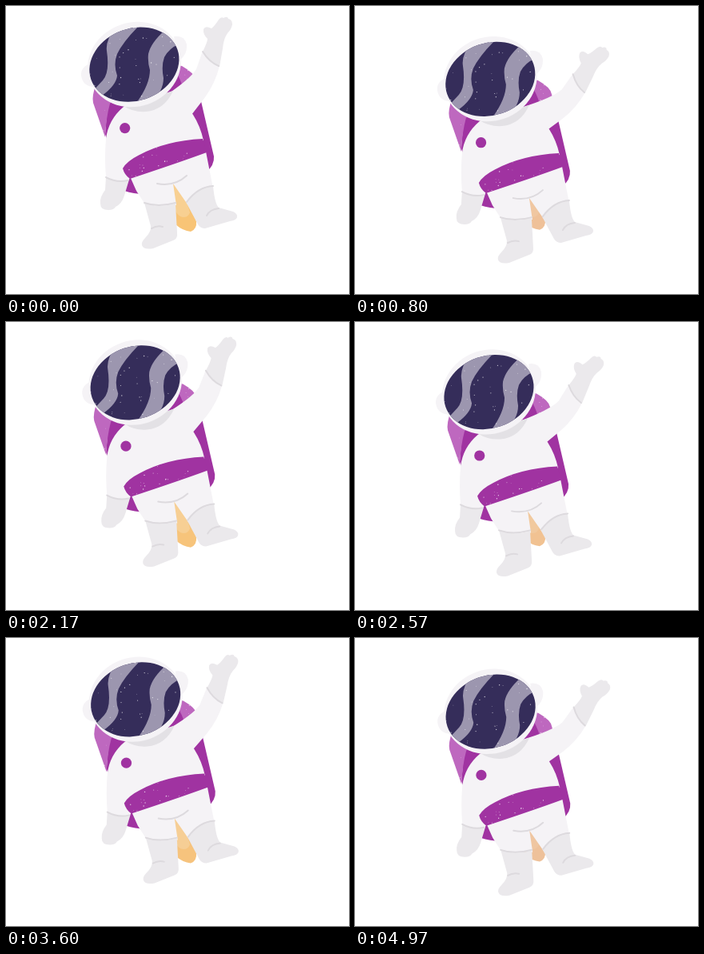
Animation, 429 px wide and 360 px high, one loop 5070 ms. Source, as an HTML page:

```html
<!DOCTYPE html>
<html lang="en">
<head>
<meta charset="utf-8">
<title>Waving astronaut</title>
<style>
  html, body { margin: 0; width: 100%; height: 100%; overflow: hidden; background: #fff; }
  svg { display: block; width: 100vw; height: 100vh; }
  .suit { fill: #f5f3f6; }
  .grey { fill: #ebe9ec; }
  .purple { fill: #a033a1; }
  .lilac { fill: #be68bf; }
  .crease { fill: none; stroke: #dddade; stroke-width: 2; stroke-linecap: round; }
</style>
</head>
<body>
<svg viewBox="0 0 429 360">
  <defs>
    <clipPath id="visorClip"><ellipse id="visor" cx="160.4" cy="73.2" rx="57.2" ry="45.2" transform="rotate(-19 160.4 73.2)"/></clipPath>
    <clipPath id="beltClip"><path id="belt" d="M146 203 Q151 194 166 186.500 Q199 168.500 246 166 L251 183 Q217 195.500 155 216 Q148 211 146 203Z"/></clipPath>
    <clipPath id="packClip"><path d="M112 100 Q108 115 110 122 L124 163 L147 130 L205 115 L240 100 Q238 85 222 76Z"/></clipPath>
  </defs>

  <path id="flame" d="M205 215 L212 273 Q221 281 231 282 Q239 279 238 269 L222 225Z"/>
  <path id="core" d="M205 215 L212 256 Q216 264 222 264 Q228 264 230 258 L220 225Z"/>

  <g id="body">
    <!-- backpack -->
    <path class="purple" d="M128 110 L124 160 L147 230 Q150 233 168 235 L250 208 Q261 199 260 188 L240 102 L222 78 L190 110Z"/>
    <path class="lilac" d="M113 96 Q107 113 109 121 L124 164 Q125 140 130 122 L150 100Z"/>
    <path class="lilac" d="M214 74 L220 75 Q236 84 237 92 L241 106 L224 112 Q221 97 214 85Z"/>
    <g id="packDust" clip-path="url(#packClip)"></g>

    <!-- legs -->
    <path class="suit" d="M155 213 L163 231 L174 248 L213 249 L209 222 L227 248 L259 228 L250 182Z"/>
    <path class="grey" d="M173 246 Q190 253 212 247 L214 283 Q215 291 209 293 L184 303 Q172 305 170 299 Q169 295 174 290 Q182 282 181 275Z"/>
    <path class="grey" d="M225 245 Q240 226 259 225 Q261 247 266 252 L284 257 Q290 260 289 264 Q288 268 280 269 L249 278 Q243 278 240 273Z"/>
    <path class="crease" d="M173 246 Q190 252 212 246 M226 245 Q240 226 259 225 M182 278 Q189 274 196 276 M251 262 Q255 254 266 253 M189 222 Q211 226 226 212"/>

    <!-- arms and torso -->
    <g id="arm">
      <path class="suit" d="M195 115 Q230 92 238 79 L246 56 L267 75 Q262 96 249 114 L232 136 L205 145Z"/>
      <path class="grey" d="M246 57 Q252 45 252 41 Q246 35 247 29 Q249 24 257 28 Q261 25 266 17 Q269 13 272 15 Q277 12 278 16 Q283 17 283 23 Q282 29 277 34 Q272 41 271 53 L267 76 Q255 70 246 57Z"/>
      <path class="crease" d="M246 57 Q254 70 266 75"/>
    </g>
    <path class="grey" d="M125 214 L124 230 Q117 239 118 247 Q118 255 128 255 Q135 255 137 251 Q145 247 148 237 L154 217Z"/>
    <path class="suit" d="M147 126 Q128 142 125 166 Q123 190 125 214 Q138 221 153 218 L160 208 L247 168 Q243 150 234 136 L213 105Z"/>
    <path class="crease" d="M125 214 Q138 221 152 218"/>
    <use href="#belt" class="purple"/>
    <g id="beltDust" clip-path="url(#beltClip)"></g>
    <circle class="purple" cx="148.700" cy="152.600" r="6.6"/>

    <!-- helmet -->
    <path d="M147 125 Q159 133 175 132 Q198 130 209 106Z" fill="#e3e1e5"/>
    <path class="suit" d="M107 71 Q93 76 94 87 Q96 101 111 101Z"/>
    <path class="suit" d="M210 38 Q223 36 226 48 Q227 62 215 69Z"/>
    <ellipse class="suit" cx="160.5" cy="73" rx="59" ry="52.5" transform="rotate(-19 160.5 73)"/>
    <use href="#visor" fill="#352d5a"/>
    <g clip-path="url(#visorClip)">
      <path fill="#9c96af" d="M140 22 Q124 42 126 56 Q130 83 121 93 L107 108 L120 112 Q138 99 139 87 Q134 73 139 60 Q146 45 167 24Z"/>
      <path fill="#9c96af" d="M199 30 Q181 46 178 60 Q177 70 180 80 Q180 99 161 124 L179 122 Q197 108 197 90 Q194 75 198 64 Q204 52 220 46Z"/>
      <g id="visorDust"></g>
    </g>
  </g>
</svg>
<script>
  const LOOP = 5070, SWAY = 1926;
  const $ = id => document.getElementById(id);

  let seed = 7;
  const random = () => (seed = seed * 16807 % 2147483647) / 2147483647;

  function dust(id, count, x, y, w, h) {
    let dots = '';
    for (let i = 0; i < count; i++) {
      dots += `<circle cx="${x + random() * w}" cy="${y + random() * h}" r="${0.3 + random() * 0.4}" fill="#fff" opacity=".75"/>`;
    }
    $(id).innerHTML = dots;
  }
  dust('visorDust', 45, 105, 27, 112, 94);
  dust('beltDust', 45, 146, 166, 106, 50);
  dust('packDust', 55, 108, 76, 132, 87);

  const blend = (from, to, k) =>
    `rgb(${from.map((c, i) => Math.round(c + (to[i] - c) * k))})`;

  function draw(now) {
    const t = now % LOOP;
    const k = (1 - Math.cos(2 * Math.PI * (t / SWAY - 0.01))) / 2;
    $('body').setAttribute('transform', `translate(${9.7 * k} ${19.8 * k})`);
    $('arm').setAttribute('transform', `rotate(${17.5 * k} 219 125)`);
    $('flame').setAttribute('transform', `translate(0 ${-2.5 * k})`);
    $('flame').setAttribute('fill', blend([248, 196, 118], [238, 193, 156], k));
    $('core').setAttribute('fill', blend([248, 208, 146], [239, 198, 162], k));
    requestAnimationFrame(draw);
  }
  draw(0);
</script>
</body>
</html>
```
